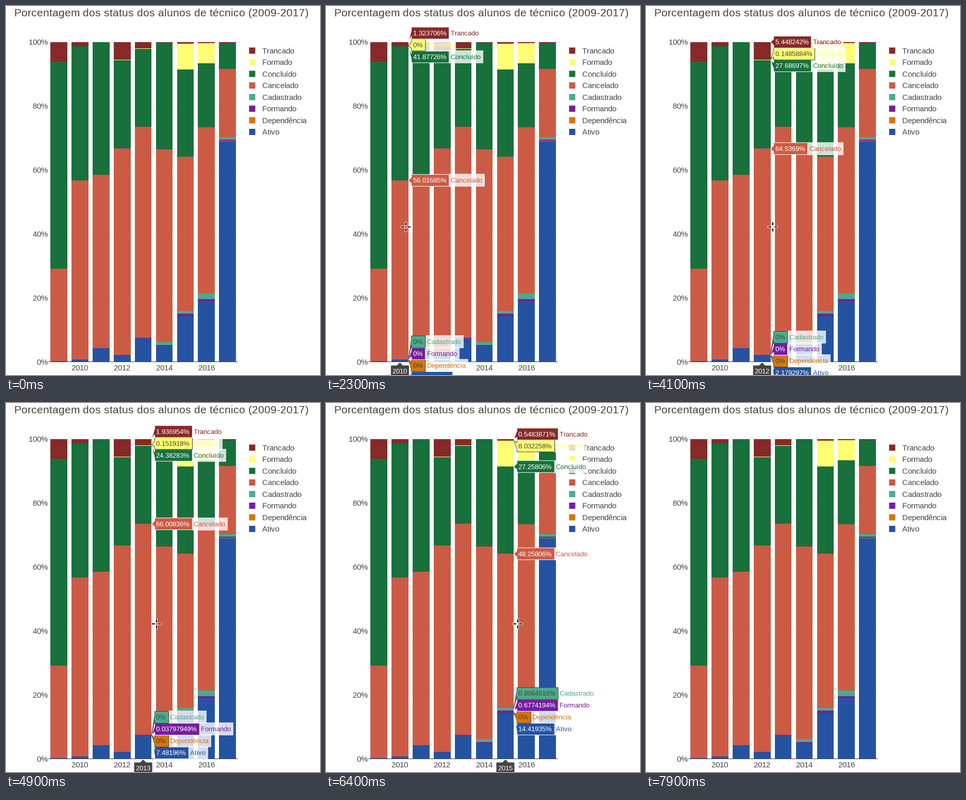
Animation, 609 px wide and 715 px high, one loop 8000 ms. Source, as a matplotlib script:

```python
import math
from itertools import count

import matplotlib.pyplot as plt
import numpy as np
from matplotlib.animation import FuncAnimation
from matplotlib.patches import Polygon, Rectangle

W, H, DPI = 609, 715, 64
PT = 72 / DPI                      # points per pixel
STEP, FRAMES = 100, 80
ENTER, LEAVE = 500, 7900           # the pointer is on stage between these

LEFT, RIGHT, TOP, BASE = 82, 450, 70, 690
SLOT = 40.91
BAR = 0.8 * SLOT
FIRST_YEAR = 2009
DARK = "#444444"

# name, fill, text colour on the fill; bottom of the stack first
SERIES = [
    ("Ativo", "#2553a1", "white"),
    ("Dependência", "#d6760a", DARK),
    ("Formando", "#751da1", "white"),
    ("Cadastrado", "#48ac88", DARK),
    ("Cancelado", "#cc5b45", "white"),
    ("Concluído", "#18703c", "white"),
    ("Formado", "#ffff73", DARK),
    ("Trancado", "#882929", "white"),
]


def cohort(active, cancelled, completed, locked=0, graduated=0,
           enrolled=0, finishing=0, repeating=0):
    """Student counts of one year, in the order of SERIES."""
    return (active, repeating, finishing, enrolled,
            cancelled, completed, graduated, locked)


COHORTS = [
    cohort(1, 94, 211, 20),
    cohort(13, 931, 696, 22),
    cohort(81, 1016, 776),
    cohort(44, 1303, 559, 110, 3),
    cohort(197, 1738, 642, 51, 4, finishing=1),
    cohort(210, 2513, 1405, 1, 0, 39, 13),
    cohort(447, 1496, 845, 17, 249, 25, 21),
    cohort(475, 1292, 497, 6, 160, 47, 13),
    cohort(1018, 312, 120, 4, 0, 12, 5, 1),
]

# key points of the pointer: time in ms, x
PATH = [(ENTER, 30), (900, 101), (1300, 119), (1700, 119), (2300, 155),
        (3500, 206), (4100, 246), (5700, 337), (5800, 337), (7800, 452)]

plt.rcParams["font.family"] = "Liberation Sans"
fig = plt.figure(figsize=(W / DPI, H / DPI), dpi=DPI, facecolor="white")
ax = fig.add_axes([0, 0, 1, 1])
ax.set_xlim(0, W)
ax.set_ylim(H, 0)
ax.axis("off")
layer = count(1)

ADVANCE = {ch: units for chars, units in [
    (" t.í", 278), ("il", 222), ("csv", 500), ("r()-", 333), ("m", 833),
    ("PA", 667), ("TF", 611), ("DC", 722), ("%", 889)] for ch in chars}


def advance(ch, size):
    """Glyph advance in whole pixels, as browsers lay out text."""
    return math.floor(ADVANCE.get(ch, 556) * size / 1000 + 0.5)


def text_width(s, size):
    return sum(advance(ch, size) for ch in s)


def put_text(x, y, s, size, color=DARK):
    """Draw s with its left end at x and its baseline at y."""
    x, y, z = round(x), round(y), next(layer)
    artists = []
    for ch in s:
        if ch != " ":
            # the trailing space keeps the glyph's origin on the pixel grid
            artists.append(ax.text(x, y, ch + " ", size=size * PT, color=color,
                                   va="baseline", ha="left", zorder=z))
        x += advance(ch, size)
    return artists


def put_rect(x0, y0, x1, y1, color, alpha=1, snap=None):
    return ax.add_patch(Rectangle((x0, y0), x1 - x0, y1 - y0, fc=color, lw=0,
                                  alpha=alpha, snap=snap, zorder=next(layer)))


def put_shape(points, fill, edge):
    return ax.add_patch(Polygon(points, closed=True, fc=fill, ec=edge, lw=PT,
                                joinstyle="miter", snap=False,
                                zorder=next(layer)))


def to_y(percent):
    return BASE - (BASE - TOP) * percent / 100


def center(i):
    return LEFT + SLOT * (i + 0.5)


def draw_axes():
    put_text(16, 20, "Porcentagem dos status dos alunos de técnico (2009-2017)", 21)
    for p in range(0, 101, 20):
        y = round(to_y(p))
        if p < 100:
            put_rect(LEFT, y - 1, RIGHT, y, "#eeeeee")
        label = f"{p}%"
        put_text(81 - text_width(label, 15), y + 5, label, 15)
    for i in range(1, len(COHORTS), 2):
        put_text(center(i) - 16, 706, str(FIRST_YEAR + i), 15)


def draw_bars():
    for i, counts in enumerate(COHORTS):
        x0, x1 = round(center(i) - BAR / 2), round(center(i) + BAR / 2)
        edges = to_y(100 * np.cumsum((0,) + counts) / sum(counts))
        for (_, fill, _), low, high in zip(SERIES, edges, edges[1:]):
            if low - high < 1e-6:
                continue
            if low - high < 2:      # keep slivers at least one pixel high
                low, high = math.ceil(low - 1e-6), math.floor(high + 1e-6)
            put_rect(x0, round(high), x1, round(low), fill)
    put_rect(LEFT, BASE - 1, RIGHT, BASE, DARK)


def draw_legend():
    for k, (name, fill, _) in enumerate(reversed(SERIES)):
        y = 86.5 + 22.5 * k
        put_rect(471.5, y - 6, 483.5, y + 6, fill, snap=False)
        put_text(497, math.floor(y + 5.5), name, 15)


def spread(ys, gap=23):
    """Move sorted positions apart, each crowded group keeping its mean."""
    blocks = []
    for k, y in enumerate(ys):
        blocks.append([y - gap * k, 1])
        while len(blocks) > 1 and blocks[-2][0] > blocks[-1][0]:
            (a, n), (b, m) = blocks[-2:]
            blocks[-2:] = [[(a * n + b * m) / (n + m), n + m]]
    flat = [v for v, n in blocks for _ in range(n)]
    return [v + gap * k for k, v in enumerate(flat)]


def hover_label(i, y, mid, series, percent):
    """Value box pointing at the bar edge, with the series name beside it."""
    name, fill, ink = series
    value = f"{percent:.7g}%"
    box = text_width(value, 13) + 8
    tag = text_width(name, 13) + 8
    side = 1 if center(i) + BAR / 2 + 6 + box + tag <= W else -1
    tip = center(i) + side * BAR / 2
    near = tip + side * 6
    far = near + side * box
    end = far + side * tag
    if side > 0:
        value_x, name_x = near + 3, far + 3
    else:
        value_x, name_x = far + 5, end + 5
    base = math.floor(mid + 5)
    tag_box = put_rect(min(far, end), mid - 12.5, max(far, end), mid + 12.5,
                       "white", 0.8)
    shape = put_shape([(tip, y), (near, mid + 6), (near, mid + 11.5),
                       (far, mid + 11.5), (far, mid - 11.5),
                       (near, mid - 11.5), (near, mid - 6)], fill, ink)
    return ([tag_box, shape] + put_text(value_x, base, value, 13, ink)
            + put_text(name_x, base, name, 13, fill))


def year_label(i):
    x, y, half = center(i), BASE, 18
    shape = put_shape([(x, y), (x + 6, y + 6), (x + half, y + 6),
                       (x + half, y + 27), (x - half, y + 27),
                       (x - half, y + 6), (x - 6, y + 6)], DARK, "white")
    return [shape] + put_text(x - 14, 712, str(FIRST_YEAR + i), 13, "white")


def hover_group(i, counts):
    artists = year_label(i)
    share = 100 * np.array(counts) / sum(counts)
    tops = to_y(np.cumsum(share))
    mids = spread(tops[::-1])[::-1]
    for series, p, top, mid in zip(SERIES, share, tops, mids):
        artists += hover_label(i, top, mid, series, p)
    return artists


def make_pointer():
    """Open cross hair: black arms with a white rim."""
    lines = []
    for color, width, a, b in (("white", 4, 2, 10), ("black", 2, 3, 9)):
        arm = np.array([-b, -a, np.nan, a, b, np.nan])
        flat = np.zeros_like(arm)
        line, = ax.plot([], [], color=color, lw=width * PT,
                        solid_capstyle="butt", zorder=next(layer))
        lines.append((line, np.append(arm, flat), np.append(flat, arm)))
    return lines


def pointer_x(t):
    return np.interp(t, *zip(*PATH))


def pointer_y(t):
    return 428 + 5 * math.exp((900 - t) / 400)


draw_axes()
draw_bars()
draw_legend()
groups = [hover_group(i, counts) for i, counts in enumerate(COHORTS)]
pointer = make_pointer()


def update(k):
    t = k * STEP
    inside = ENTER <= t < LEAVE
    x, y = round(pointer_x(t)), round(pointer_y(t))
    # the labels follow the pointer one step late
    slot = math.floor((pointer_x(t - STEP) - LEFT) / SLOT)
    for i, group in enumerate(groups):
        for artist in group:
            artist.set_visible(inside and i == slot)
    for line, dx, dy in pointer:
        line.set_visible(inside)
        line.set_data(x + dx, y + dy)


anim = FuncAnimation(fig, update, frames=FRAMES, init_func=lambda: update(0),
                     interval=STEP, repeat=True, repeat_delay=0, blit=False)
plt.show()
```
